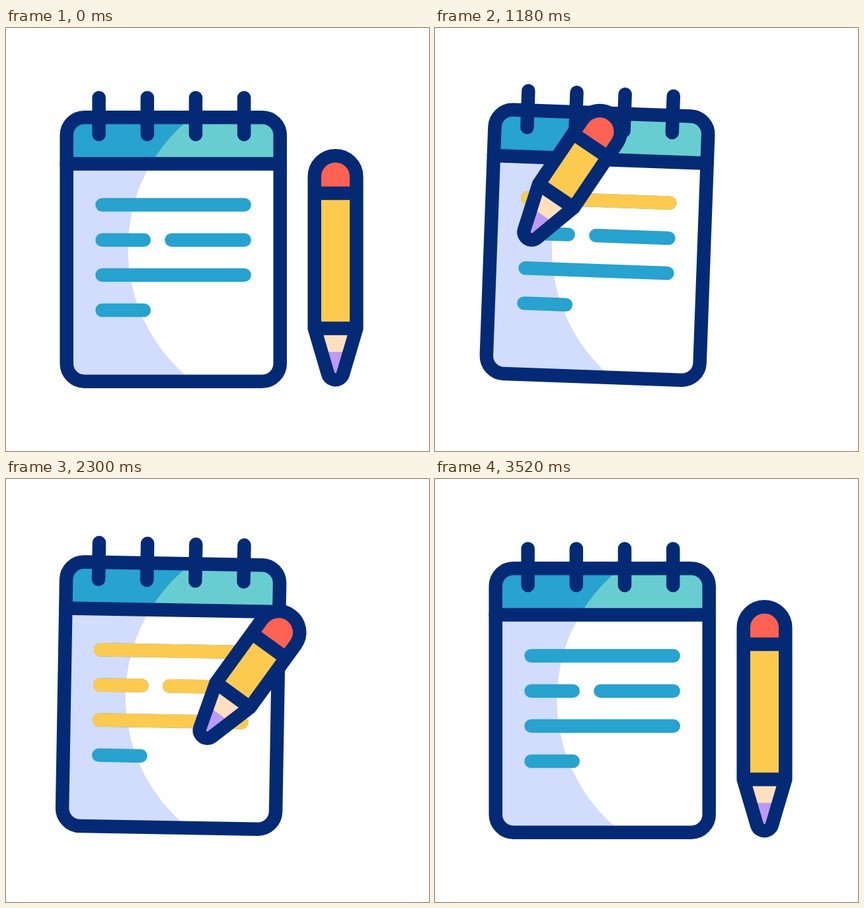
Animation, 640 px wide and 640 px high, one loop 3580 ms. Source, as an HTML page with a canvas:

```html
<!DOCTYPE html>
<html lang="en">
<head>
<meta charset="utf-8">
<title>Notepad and pencil</title>
<style>
  html, body { margin: 0; width: 100%; height: 100%; overflow: hidden; background: #fff; }
  canvas { display: block; width: 640px; height: 640px; }
</style>
</head>
<body>
<canvas id="stage" width="640" height="640"></canvas>
<script>
const ctx = document.getElementById('stage').getContext('2d');
const LOOP = 3580, STROKE = 20.5;
const NAVY = '#042a76', BLUE = '#28a2ce', TEAL = '#68cdd1', LILAC = '#d2dcfd',
      YELLOW = '#fdca50', RED = '#ff6253', PEACH = '#ffe0be', PURPLE = '#bc9bf2';

// Ruled lines: height, writing time, and x ranges of the strokes
const rows = [
  { y: 267.5, from: 620,  to: 960,  parts: [[145.5, 360.7]] },
  { y: 320.7, from: 1200, to: 1486, parts: [[145.5, 208.8], [250.5, 360.7]] },
  { y: 373.8, from: 1740, to: 2040, parts: [[145.5, 360.7]] },
  { y: 427,   from: 2530, to: 2830, parts: [[145.5, 208.8]] }
];

const ease = u => (1 - Math.cos(Math.PI * u)) / 2;

// Eased value through [time, value] pairs
function track(t, keys) {
  if (t <= keys[0][0]) return keys[0][1];
  for (let i = 1; i < keys.length; i++) {
    const [t0, a] = keys[i - 1], [t1, b] = keys[i];
    if (t < t1) return a + (b - a) * ease((t - t0) / (t1 - t0));
  }
  return keys[keys.length - 1][1];
}

function pose(t) {
  let angle = track(t, [[2200, 0], [2580, 6], [3320, 0]]);
  let lift = track(t, [[60, 0], [440, 8], [2580, 8], [3320, 0]]);
  if (t > 580 && t < 2200) {          // three swings, each with a hop
    const swing = (t - 580) / 540, phase = swing % 1;
    angle = -6 * Math.sin(Math.PI * swing);
    const hop = (phase * 540 - 70) / 360;
    if (hop > 0 && hop < 1) lift += 15 * Math.sin(Math.PI * hop) ** 2;
  }
  const arc = t > 60 && t < 440 ? 60 * Math.sin(Math.PI * (t - 60) / 380) : 0;
  return {
    angle, lift,
    x: track(t, [[60, 498.5], [440, 150], [620, 150], [960, 361], [1040, 361], [1200, 146],
      [1486, 361], [1580, 361], [1740, 146], [2040, 361], [2190, 361], [2530, 146],
      [2830, 209], [3300, 498.5]]),
    y: track(t, [[60, 520.3], [440, 267.5], [1040, 267.5], [1200, 320.7], [1580, 320.7],
      [1740, 373.8], [2190, 373.8], [2530, 427], [2830, 427], [3300, 520.3]]) - arc,
    tilt: track(t, [[60, 0], [440, 33], [920, 33], [1440, 31], [2300, 35], [2800, 26], [3520, 0]]),
    cut: track(t, [[60, 0], [440, 112], [2830, 112], [3400, 0]]),
    fade: track(t, [[2900, 1], [3300, 0]])
  };
}

function line(x1, y1, x2, y2, color = NAVY) {
  ctx.strokeStyle = color;
  ctx.beginPath();
  ctx.moveTo(x1, y1);
  ctx.lineTo(x2, y2);
  ctx.stroke();
}

function fillRect(color, x, y, w, h) {
  ctx.fillStyle = color;
  ctx.fillRect(x, y, w, h);
}

function fillPoly(color, ...points) {
  ctx.fillStyle = color;
  ctx.beginPath();
  points.forEach(p => ctx.lineTo(...p));
  ctx.fill();
}

function drawPad(t, p) {
  const cover = new Path2D();
  cover.roundRect(91.7, 135.2, 323, 399.5, 27);
  const light = new Path2D();
  light.arc(438.5, 334, 254, 0, 7);

  ctx.save();
  ctx.clip(cover);
  fillRect(LILAC, 80, 205, 350, 340);
  fillRect(BLUE, 80, 125, 350, 80);
  ctx.clip(light);
  fillRect('#fff', 80, 205, 350, 340);
  fillRect(TEAL, 80, 125, 350, 80);
  ctx.restore();

  ctx.lineCap = 'round';
  for (const row of rows) {
    const strokes = color => row.parts.forEach(([a, b]) => line(a, row.y, b, row.y, color));
    strokes(BLUE);
    if (t < row.from || !p.fade) continue;
    ctx.save();
    ctx.globalAlpha = p.fade;
    ctx.beginPath();
    ctx.rect(0, row.y - 15, t < row.to ? p.x : 400, 30);
    ctx.clip();
    strokes(YELLOW);
    ctx.restore();
  }

  ctx.strokeStyle = NAVY;
  ctx.stroke(cover);
  line(91.7, 205.5, 414.7, 205.5);
  for (let i = 0; i < 4; i++) line(140.6 + i * 73.2, 105.5, 140.6 + i * 73.2, 161);
}

// Origin at the centre of the rounded tip, pencil pointing down
function drawPencil(cut) {
  const cap = cut - 295.3, band = cut - 270.3, neck = -65.8, half = 31.8;
  const body = new Path2D();
  body.moveTo(-half, neck);
  body.lineTo(-half, cap);
  body.arc(0, cap, half, Math.PI, 0);
  body.lineTo(half, neck);
  body.arc(0, 0, 11.9, 0.29, Math.PI - 0.29);
  body.closePath();

  ctx.fillStyle = RED;
  ctx.fill(body);
  fillRect(YELLOW, -half, band, 2 * half, neck - band);
  fillPoly(PEACH, [-28, neck], [28, neck], [0, 10]);
  fillPoly(PURPLE, [-15, -30.3], [15, -30.3], [0, 10]);
  ctx.strokeStyle = NAVY;
  ctx.stroke(body);
  ctx.lineCap = 'butt';
  line(-half, band, half, band);
  line(-half, neck, half, neck);
}

function draw(now) {
  const t = now % LOOP, p = pose(t), rad = Math.PI / 180;
  ctx.setTransform(1, 0, 0, 1, 0, 0);
  fillRect('#fff', 0, 0, 640, 640);
  ctx.lineWidth = STROKE;
  ctx.lineJoin = 'round';
  ctx.translate(212, 125 - p.lift);
  ctx.rotate(p.angle * rad);
  ctx.translate(-212, -125);
  drawPad(t, p);
  ctx.translate(p.x, p.y);
  ctx.rotate(p.tilt * rad);
  drawPencil(p.cut);
  requestAnimationFrame(draw);
}
requestAnimationFrame(draw);
</script>
</body>
</html>
```
